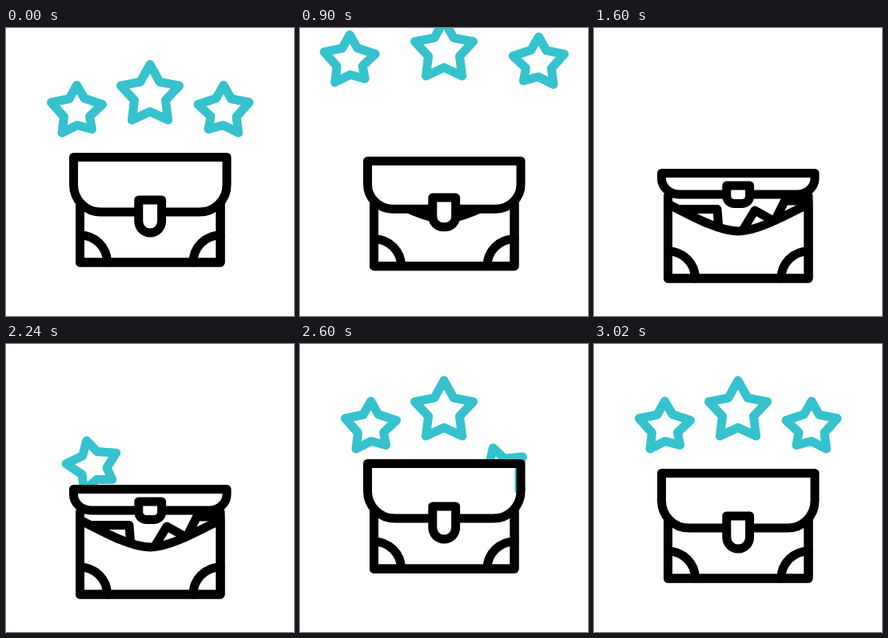
An HTML page with a canvas for the animation above (3.6 s loop, 360 px wide and 360 px high).

```html
<!DOCTYPE html>
<html lang="en">
<head>
<meta charset="utf-8">
<title>Briefcase with stars</title>
<style>
html, body { margin: 0; width: 100%; height: 100%; overflow: hidden; background: #fff; }
canvas { display: block; width: 100vw; height: 100vh; }
</style>
</head>
<body>
<canvas id="stage" width="360" height="360"></canvas>
<script>
const ctx = document.getElementById('stage').getContext('2d');
const LOOP = 3600, INK = '#000', TEAL = '#35c2ce';
const LEFT = 92.5, RIGHT = 268;

const lerp = (a, b, k) => a + (b - a) * k;
function ease(t, from, to) {
  const u = Math.min(1, Math.max(0, (t - from) / (to - from)));
  return u * u * (3 - 2 * u);
}

// Star outlines around their own centres
const smallStar = [[0, -29.5], [9.5, -13], [32, -5.5], [16, 9.5], [19, 25.5],
  [0.5, 20.5], [-18.5, 30], [-16, 10], [-32, -8], [-9.5, -12.5]];
const mirrored = smallStar.map(([x, y]) => [-x, y]);
const bigStar = Array.from({ length: 10 }, (_, i) => {
  const r = i % 2 ? 20.5 : 38.4, a = (i * 36 - 90) * Math.PI / 180;
  return [r * Math.cos(a), r * Math.sin(a)];
});

const stars = [
  { pts: smallStar, x: 88.5, y: 101, side: -1, rise: 270, start: 2020, dx: 46, dy: 114 },
  { pts: bigStar, x: 180, y: 84, side: 0, rise: 236, start: 2200, dx: 0, dy: 141 },
  { pts: mirrored, x: 272, y: 101, side: 1, rise: 259, start: 2400, dx: -44, dy: 114 }
];

function drawStar(s, t) {
  let x = s.x, y = s.y, turn = 0;
  if (t < 1600) {
    const p = ease(t, 580, 1600);
    x += s.side * (145 * p - 138 * p * p);
    y -= s.rise * p;
  } else {
    if (t < s.start) return;
    const q = 1 - ease(t, s.start, s.start + 400);
    x += s.dx * q;
    y += s.dy * q;
    turn = -34 * q;
  }
  ctx.save();
  ctx.translate(x, y);
  ctx.rotate(turn * Math.PI / 180);
  ctx.beginPath();
  s.pts.forEach(([px, py]) => ctx.lineTo(px, py));
  ctx.closePath();
  ctx.strokeStyle = TEAL;
  ctx.stroke();
  ctx.restore();
}

function line(...pts) {
  ctx.beginPath();
  pts.forEach(([x, y]) => ctx.lineTo(x, y));
  ctx.stroke();
}

function pocketEdge(depth) {
  ctx.moveTo(LEFT, 200);
  ctx.bezierCurveTo(122, 215, 156, depth, 180, depth);
  ctx.bezierCurveTo(204, depth, 238, 215, RIGHT, 200);
}

function drawBody(open) {
  line([LEFT, 206.5], [154, 206.5], [156, 232]);
  line([187, 231], [201, 208], [226, 222]);
  line([228, 217], [238.5, 196], [RIGHT, 196]);

  const depth = 230 + 4 * Math.min(1, open * 5);
  ctx.beginPath();
  pocketEdge(depth);
  ctx.lineTo(RIGHT, 293);
  ctx.lineTo(LEFT, 293);
  ctx.closePath();
  ctx.fill();
  ctx.stroke();

  line([LEFT, 190], [LEFT, 293], [RIGHT, 293], [RIGHT, 190]);
  ctx.beginPath();
  ctx.arc(LEFT, 293, 34, -Math.PI / 2, 0);
  ctx.stroke();
  ctx.beginPath();
  ctx.arc(RIGHT, 293, 34, Math.PI, Math.PI * 1.5);
  ctx.stroke();
}

// Box with square top and elliptic lower corners
function tray(x0, x1, top, bottom, rx, ry) {
  ctx.beginPath();
  ctx.moveTo(x0, top);
  ctx.lineTo(x1, top);
  ctx.lineTo(x1, bottom - ry);
  ctx.ellipse(x1 - rx, bottom - ry, rx, ry, 0, 0, Math.PI / 2);
  ctx.ellipse(x0 + rx, bottom - ry, rx, ry, 0, Math.PI / 2, Math.PI);
  ctx.closePath();
}

function draw(t) {
  const open = t < 2000 ? ease(t, 580, 1600) : 1 - ease(t, 2240, 2600);
  let shift = 20 * open;
  if (t > 2240) shift = lerp(lerp(20, -12, ease(t, 2240, 2600)), 0, ease(t, 2600, 3020));

  ctx.fillStyle = '#fff';
  ctx.fillRect(0, 0, 360, 360);
  ctx.lineWidth = 11;
  ctx.lineJoin = ctx.lineCap = 'round';
  ctx.strokeStyle = INK;

  const top = 161.5, bottom = lerp(230, 188, open ** 1.1);
  const lid = () => tray(84.5, 276, top, bottom, lerp(34, 22, open), lerp(34, 20, open));

  ctx.save();
  ctx.translate(0, shift);
  drawBody(open);
  lid();
  ctx.fill();
  ctx.restore();

  // Stars stay hidden behind the case
  ctx.save();
  ctx.beginPath();
  ctx.rect(0, 0, 360, top + shift);
  ctx.rect(268.5, top + shift, 91.5, 360);
  ctx.clip();
  stars.forEach(s => drawStar(s, t));
  ctx.restore();

  ctx.save();
  ctx.translate(0, shift);
  lid();
  ctx.stroke();
  tray(165.8, 194.6, bottom - lerp(15, 11, open), bottom + lerp(26, 11.5, open),
    lerp(14.4, 10, open), lerp(14.4, 9, open));
  ctx.fill();
  ctx.stroke();
  ctx.restore();
}

let begin;
function tick(now) {
  if (begin === undefined) begin = now;
  draw((now - begin) % LOOP);
  requestAnimationFrame(tick);
}
draw(0);
requestAnimationFrame(tick);
</script>
</body>
</html>
```
